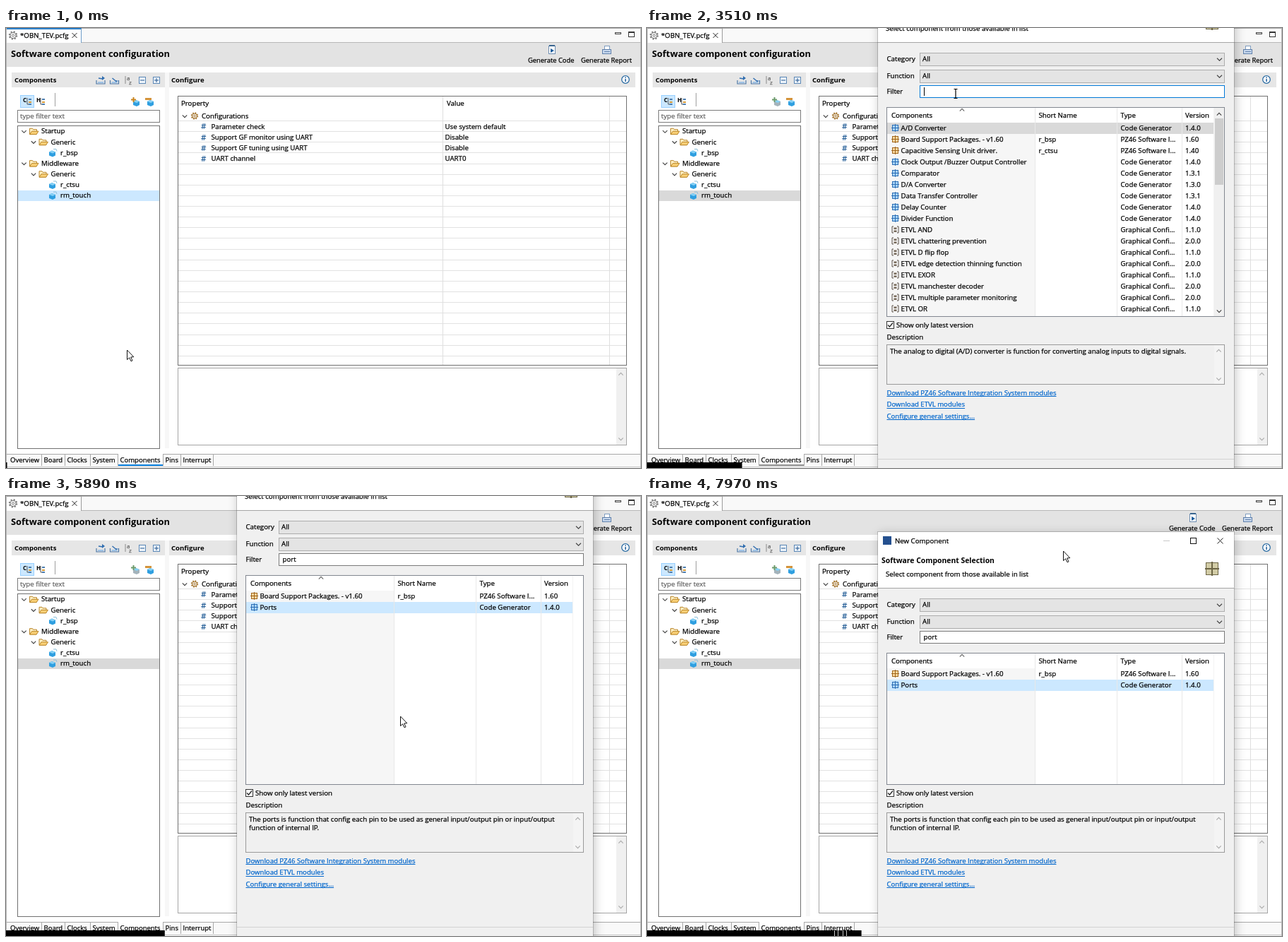
These frames come from a looping animation (899 px wide and 623 px high, 8000 ms). An HTML page with a canvas:

```html
<!DOCTYPE html>
<html lang="en">
<head>
<meta charset="utf-8">
<title>Component configuration</title>
<style>
  html, body { margin: 0; width: 100%; height: 100%; overflow: hidden; background: #fff; }
  canvas { display: block; }
</style>
</head>
<body>
<canvas id="stage" width="899" height="623"></canvas>
<script>
const ctx = document.getElementById('stage').getContext('2d');
const LOOP = 8000;
const FONT = '"Open Sans", "Noto Sans", sans-serif';
const BLUE = '#0078d7', PICK = '#cce8ff', IDLE = '#d9d9d9', FACE = '#f0f0f0';

// Moments of the interaction, in ms
const AT = { addClick: 1560, open: 1750, leaveAdd: 2120, fieldClick: 3050,
             filter: 4060, rowClick: 5100, drag: 7400 };
const KEYS = [3650, 3760, 3900, 4000];

const PATH = [
  [0, 171, 456], [120, 171, 456], [840, 206, 281], [1400, 181, 105], [2060, 181, 105],
  [2850, 437, 93], [4450, 437, 93], [4850, 432, 154], [5250, 432, 154],
  [5720, 558, 312], [5950, 558, 312], [6560, 596, 141], [7100, 595, -32],
  [7400, 595, -32], [7530, 594, 2], [7750, 591, 53], [7970, 589, 78], [8000, 589, 78]
];
const GROW = [[0, 0], [AT.drag, 0], [7530, 34], [7750, 85], [7970, 110], [8000, 110]];

const CATALOG = [
  ['A/D Converter', '', 0, '1.4.0'],
  ['Board Support Packages. - v1.60', 'r_bsp', 1, '1.60'],
  ['Capacitive Sensing Unit driver.', 'r_ctsu', 1, '1.40'],
  ['Clock Output /Buzzer Output Controller', '', 0, '1.4.0'],
  ['Comparator', '', 0, '1.3.1'],
  ['D/A Converter', '', 0, '1.3.0'],
  ['Data Transfer Controller', '', 0, '1.3.1'],
  ['Delay Counter', '', 0, '1.4.0'],
  ['Divider Function', '', 0, '1.4.0'],
  ['ETVL AND', '', 2, '1.1.0'],
  ['ETVL chattering prevention', '', 2, '2.0.0'],
  ['ETVL D flip flop', '', 2, '1.1.0'],
  ['ETVL edge detection thinning function', '', 2, '2.0.0'],
  ['ETVL EXOR', '', 2, '1.1.0'],
  ['ETVL manchester decoder', '', 2, '2.0.0'],
  ['ETVL multiple parameter monitoring', '', 2, '2.0.0'],
  ['ETVL OR', '', 2, '1.1.0']
];
const FOUND = [CATALOG[1], ['Ports', '', 0, '1.4.0']];
const TYPES = ['Code Generator', 'PZ46 Software I...', 'Graphical Confi...'];

function rect(x, y, w, h, c) { ctx.fillStyle = c; ctx.fillRect(x, y, w, h); }

function box(x, y, w, h, fill, edge) {
  if (fill) rect(x, y, w, h, fill);
  ctx.strokeStyle = edge;
  ctx.lineWidth = 1;
  ctx.strokeRect(x + 0.5, y + 0.5, w - 1, h - 1);
}

// y is the middle of the capitals; the baseline sits on a whole pixel
function text(s, x, y, color = '#000', size = 9.7, weight = 400) {
  const base = Math.round(y + size * 0.34);
  ctx.font = `${weight} ${size}px ${FONT}`;
  ctx.fillStyle = color;
  ctx.fillText(s, x, base);
  if (weight === 400) {
    // a hairline outline gives small text its dense look
    ctx.strokeStyle = color;
    ctx.lineWidth = 0.25;
    ctx.strokeText(s, x, base);
  }
  return ctx.measureText(s).width;
}

function bold(s, x, y, size) { text(s, x, y, '#000', size, 700); }

function line(points, color, width = 1) {
  ctx.beginPath();
  points.forEach(([x, y], i) => i ? ctx.lineTo(x, y) : ctx.moveTo(x, y));
  ctx.strokeStyle = color;
  ctx.lineWidth = width;
  ctx.stroke();
}

function poly(points, fill, edge, width = 1) {
  ctx.beginPath();
  points.forEach(([x, y], i) => i ? ctx.lineTo(x, y) : ctx.moveTo(x, y));
  ctx.closePath();
  ctx.fillStyle = fill;
  ctx.fill();
  if (edge) { ctx.strokeStyle = edge; ctx.lineWidth = width; ctx.stroke(); }
}

function chevron(x, y, dir, color = '#404040', r = 3.2) {
  line([[x - r, y - dir * r / 2], [x, y + dir * r / 2], [x + r, y - dir * r / 2]], color, 1.1);
}

function cross(x, y, r) {
  line([[x - r, y - r], [x + r, y + r]], '#222');
  line([[x - r, y + r], [x + r, y - r]], '#222');
}

function gear(x, y, r, color) {
  ctx.strokeStyle = color;
  for (const [rad, w, dash] of [[r, 1.8, [r * 0.4, r * 0.385]], [r * 0.75, 1.1, []], [r * 0.3, 1, []]]) {
    ctx.beginPath();
    ctx.setLineDash(dash);
    ctx.lineWidth = w;
    ctx.arc(x, y, rad, 0, 7);
    ctx.stroke();
  }
  ctx.setLineDash([]);
}

function folder(x, y) {
  poly([[x, y + 4], [x, y - 4], [x + 4, y - 4], [x + 5, y - 2.5], [x + 10, y - 2.5], [x + 10, y + 4]], '#fff0c4', '#b98528');
  poly([[x, y + 4.5], [x + 3, y], [x + 12.5, y], [x + 9.5, y + 4.5]], '#f8cf76', '#b98528');
}

function cube(x, y, color = '#2f9fe0') {
  poly([[x, y - 2], [x + 4, y - 4], [x + 9, y - 2], [x + 9, y + 3], [x + 5, y + 5], [x, y + 3]], color);
  poly([[x, y - 2], [x + 4, y - 4], [x + 9, y - 2], [x + 5, y]], '#86d0f5');
}

function driver(x, y) {
  cube(x, y + 1);
  line([[x + 6, y - 5], [x + 10, y - 5], [x + 11, y - 2]], '#8ebfd9');
}

function tiles(x, y, r, fill, edge) {
  box(x - r, y - r, r * 2, r * 2, fill, edge);
  rect(x - 0.5, y - r - 1, 1, r * 2 + 2, edge);
  rect(x - r - 1, y - 0.5, r * 2 + 2, 1, edge);
}

function rowIcon(kind, x, y) {
  if (kind === 0) return tiles(x, y, 4.5, '#a9d4f7', '#2d6fb5');
  if (kind === 1) return tiles(x, y, 4.5, '#fbd9a0', '#a0661c');
  for (const s of [-1, 1])
    line([[x + s * 2.5, y - 4.5], [x + s * 4.5, y - 4.5], [x + s * 4.5, y + 4.5], [x + s * 2.5, y + 4.5]], '#5a5148');
  rect(x - 2, y - 3, 4, 2.5, '#77695a');
  rect(x - 2, y + 1, 4, 2.5, '#77695a');
}

function lerpTrack(track, t, ease) {
  let i = 1;
  while (i < track.length - 1 && track[i][0] < t) i++;
  const a = track[i - 1], b = track[i];
  let k = Math.min(1, Math.max(0, (t - a[0]) / (b[0] - a[0])));
  if (ease) k = k * k * (3 - 2 * k);
  return a.slice(1).map((v, n) => v + (b[n + 1] - v) * k);
}

function topBar(active) {
  rect(0, 0, 899, 21, '#f9f9f9');
  rect(0, 0, 899, 1, '#a8a8a8');
  rect(0, 0, 107, 21, '#fff');
  rect(0, 0, 107, active ? 2 : 1, active ? '#2a7fc9' : '#999');
  rect(106, 1, 1, 20, active ? '#6d9cc8' : '#999');
  rect(107, 20, 792, 1, '#b8b8b8');
  gear(10, 10.5, 5.3, '#777');
  text('*OBN_TEV.pcfg', 20, 10.5);
  cross(97, 10.5, 3.5);
  box(862, 6, 9, 3, '#fff', '#444');
  box(881, 5, 9, 8, '#fff', '#333');
  rect(881, 5, 9, 2, '#333');
}

function header() {
  rect(0, 21, 899, 34, '#e3e3e3');
  bold('Software component configuration', 7, 36.5, 12.9);
  box(768, 25, 10, 12, '#fff', '#6c8cb0');
  rect(769, 24, 8, 2, '#39658f');
  poly([[771, 29], [776, 32], [771, 35]], '#1d5c9c');
  text('Generate Code', 739, 45.5, '#000', 9.4);
  box(847, 25, 8, 6, '#fff', '#7f9dc0');
  box(844, 30, 13, 7, '#c9d9ee', '#5f80ab');
  rect(847, 33, 8, 1, '#5f80ab');
  text('Generate Report', 814, 45.5, '#000', 9.3);
}

function sectionTools() {
  for (const [x, s] of [[134, 1], [153.5, -1]]) {
    line([[x - 6, 74], [x - 6, 79], [x + 6, 79], [x + 6, 74]], '#4e79a8', 1.2);
    rect(x - 4, 76, 8, 2, '#9fc3e6');
    line([[x - 3, 71], [x + 3, 74 - s * 2]], '#2f6db0', 1.4);
    poly([[x + 6, 73 - s * 2], [x + 2, 71 - s * 3], [x + 2, 75 - s]], '#2f6db0');
  }
  line([[169, 68], [169, 79]], '#8a8a8a');
  text('a', 171, 71, '#666', 8);
  text('z', 174, 77, '#666', 8);
  for (const x of [188, 208]) {
    box(x, 69, 10, 10, '#eef5fc', '#5b87b5');
    rect(x + 2, 73.5, 6, 1, '#24568f');
  }
  rect(212.5, 71, 1, 6, '#24568f');
}

function treePanel(t, hoverAdd) {
  rect(8, 63, 217, 21, '#e6e6e6');
  bold('Components', 12, 73.5, 9.4);
  sectionTools();

  box(20, 95, 20, 18, PICK, '#99d1ff');
  bold('C', 24, 102, 8);
  bold('H', 43, 102, 8);
  for (const x of [32, 51]) {
    line([[x - 2, 99], [x - 2, 108], [x + 2, 108]], '#555');
    for (const y of [100, 104, 107]) rect(x, y, 4, 2, y === 104 ? '#d79a35' : '#4d7fb3');
  }
  rect(69, 92, 1, 19, '#a0a0a0');

  const grey = t >= AT.leaveAdd;
  if (hoverAdd) box(174, 95, 20, 18, PICK, '#99d1ff');
  cube(180, 106, grey ? '#a4b3bb' : '#2f9fe0');
  const plus = grey ? '#6c9b6c' : '#c9851f';
  rect(177, 100.5, 7, 2, plus);
  rect(179.5, 98, 2, 7, plus);
  cube(200, 106);
  rect(197, 99, 9, 3, '#d4933a');

  box(16, 116, 202, 18, '#fff', '#7a7a7a');
  text('type filter text', 20, 125, '#666');
  box(16, 138, 202, 458, '#fff', '#707070');
  const rows = [['Startup', 0], ['Generic', 1], ['r_bsp', 2], ['Middleware', 0],
                ['Generic', 1], ['r_ctsu', 2], ['rm_touch', 2]];
  rect(17, 230, 200, 15, t < AT.addClick ? PICK : IDLE);
  rows.forEach(([name, depth], i) => {
    const y = 146.2 + i * 15.15, x = 33.5 + depth * 13.5;
    if (depth < 2) { chevron(x - 8, y + 0.5, 1); folder(x, y); }
    else driver(61, y);
    text(name, x + 16.5, y);
  });
}

function propertyPanel() {
  rect(225, 63, 6, 532, '#f7f7f7');
  rect(231, 63, 660, 21, '#e6e6e6');
  bold('Configure', 234, 73.5, 9.6);
  ctx.beginPath();
  ctx.arc(877, 73, 5.3, 0, 7);
  ctx.fillStyle = '#fff';
  ctx.fill();
  ctx.strokeStyle = '#2b6ca3';
  ctx.lineWidth = 1.3;
  ctx.stroke();
  rect(876.3, 72, 1.5, 4, '#1d5c9c');
  rect(876.3, 69.5, 1.5, 1.5, '#1d5c9c');

  box(243, 96, 636, 382, '#fff', '#707070');
  for (let i = 0; i < 23; i++) rect(244, Math.round(131 + i * 15.13), 634, 1, '#e2e2e2');
  for (const x of [618, 854]) rect(x, 97, 1, 380, '#dedede');
  text('Property', 248, 107);
  text('Value', 624, 107);
  chevron(253, 125, 1);
  gear(267, 124.5, 4.3, '#a4752f');
  text('Configurations', 277, 124.5);
  [['Parameter check', 'Use system default'], ['Support GF monitor using UART', 'Disable'],
   ['Support GF tuning using UART', 'Disable'], ['UART channel', 'UART0']].forEach(([name, value], i) => {
    const y = 139.5 + i * 15.15;
    text('#', 276, y, '#1f5a94', 11.5, 600);
    text(name, 290.5, y);
    text(value, 621.5, y);
  });

  box(243, 481, 636, 110, '#fff', '#a5a5a5');
  rect(864, 482, 14, 108, FACE);
  chevron(870.5, 490, -1, '#aaa');
  chevron(870.5, 582, 1, '#aaa');
}

function bottomTabs(active) {
  rect(0, 603, 899, 20, '#f9f9f9');
  rect(0, 603, 899, 1, '#a8a8a8');
  rect(159, 603, 63, 17, '#fff');
  const tabs = ['Overview', 'Board', 'Clocks', 'System', 'Components', 'Pins', 'Interrupt'];
  const edges = [3, 51, 84, 120, 159, 223, 248, 294];
  tabs.forEach((name, i) => {
    text(name, edges[i] + (i ? 2.5 : 3), 612, '#000', 9.5);
    rect(edges[i + 1] - 1, 604, 1, 16, '#a8a8a8');
  });
  rect(159, 618, 63, 2, active ? BLUE : '#8a8a8a');
  rect(0, 621, 899, 1, '#c4c4c4');
  rect(0, 0, 1, 623, '#b5b5b5');
  rect(898, 0, 1, 623, '#b5b5b5');
}

function combo(label, y, hover) {
  text(label, 339.5, y);
  box(386, y - 9, 432, 19, hover ? '#e5f1fb' : '#e4e4e4', hover ? BLUE : '#adadad');
  text('All', 390, y);
  chevron(810.5, y + 0.5, 1, '#444', 3.5);
}

function filterField(t, y) {
  const focused = t >= AT.fieldClick && t < AT.rowClick;
  text('Filter', 339.5, y);
  box(386, y - 9, 432, 18, '#fff', focused ? BLUE : '#7a7a7a');
  const typed = 'port'.slice(0, KEYS.filter(k => t >= k).length);
  const w = text(typed, 391.5, y);
  const last = [AT.fieldClick, ...KEYS].filter(k => t >= k).pop();
  if (focused && (t - last) % 1060 < 530) rect(Math.round(391.5 + w), y - 6, 1, 12, '#000');
}

function componentTable(t, top, cur) {
  const filtered = t >= AT.filter;
  const rows = filtered ? FOUND : CATALOG;
  const first = top + 22, h = 409 - top;
  let picked = filtered ? -1 : 0;
  if (t >= AT.rowClick) picked = 1;
  const idle = t >= AT.fieldClick && t < AT.rowClick;

  ctx.save();
  ctx.beginPath();
  ctx.rect(339, top, 479, h);
  ctx.clip();
  rect(339, top, 479, h, '#fff');
  rect(340, first, 209, h, '#f6f6f6');
  rows.forEach(([name, short, kind, version], i) => {
    const y0 = first + i * 16, y = y0 + 8;
    const hover = cur.visible && cur.x > 340 && cur.x < 802 && cur.y >= y0 && cur.y < y0 + 16;
    if (i === picked) rect(340, y0, 462, 16, idle ? IDLE : PICK);
    else if (hover) rect(340, y0, 462, 16, '#e5f3ff');
    rowIcon(kind, 351.5, y - 0.5);
    text(name, 359.5, y);
    text(short, 554.5, y);
    text(TYPES[kind], 670.5, y);
    text(version, 762, y);
  });
  for (const x of [549, 665, 757, 802]) rect(x, top, 1, h, x === 802 ? '#f3f3f3' : '#e8e8e8');
  if (!filtered) {
    rect(803, top + 1, 14, h - 2, FACE);
    rect(804, top + 16, 12, 94, '#cdcdcd');
    chevron(810, top + 10, -1);
    chevron(810, 401, 1);
  }
  ctx.restore();

  [['Components', 346], ['Short Name', 554.5], ['Type', 670.5], ['Version', 762]]
    .forEach(([s, x]) => text(s, x, top + 11.5));
  chevron(446, top + 4, -1, '#666');
  box(339, top, 479, h, null, '#828790');
}

function dialog(t, cur) {
  const dy = Math.round(lerpTrack(GROW, t)[0]) - 110;
  const top = 51 + dy, tall = 660 - top;
  ctx.save();
  ctx.shadowColor = 'rgba(0,0,0,.24)';
  ctx.shadowBlur = 14;
  ctx.shadowOffsetX = 2;
  ctx.shadowOffsetY = 3;
  rect(327, top, 504, tall, FACE);
  ctx.restore();
  box(326, top - 1, 506, tall + 2, null, 'rgba(0,0,0,.18)');

  rect(327, top, 504, 79, '#fff');
  rect(334, 57 + dy, 12, 12, '#24508f');
  text('New Component', 351, 63.5 + dy);
  rect(731, 63 + dy, 9, 1, '#c8c8c8');
  box(769, 59 + dy, 9, 9, null, '#111');
  cross(811.5, 63.5 + dy, 4);
  bold('Software Component Selection', 332, 91 + dy, 10.4);
  text('Select component from those available in list', 338, 111 + dy);
  tiles(800, 103 + dy, 9, '#d2cca6', '#6c6545');
  rect(799, 93 + dy, 2, 20, '#6c6545');
  rect(790, 102 + dy, 20, 2, '#6c6545');
  rect(327, 130 + dy, 504, 1, '#a5a5a5');

  const over = y => cur.visible && cur.x > 386 && cur.x < 818 && Math.abs(cur.y - y) < 9.5;
  const [category, func, filter] = [154 + dy, 178 + dy, 200 + dy];
  combo('Category', category, over(category));
  combo('Function', func, over(func));
  filterField(t, filter);
  componentTable(t, 222 + dy, cur);

  box(339, 415, 11, 11, '#fff', '#333');
  line([[341, 420.5], [343.5, 423], [348, 417.5]], '#222', 1.3);
  text('Show only latest version', 353, 420.5);
  text('Description', 339.5, 438);
  box(339, 448, 479, 57, FACE, '#9a9a9a');
  rect(803, 449, 14, 55, '#f4f4f4');
  chevron(809.5, 457, -1, '#aaa');
  chevron(809.5, 497, 1, '#aaa');
  if (t < AT.filter) {
    text('The analog to digital (A/D) converter is function for converting analog inputs to digital signals.', 344, 457.5);
  } else if (t >= AT.rowClick) {
    text('The ports is function that config each pin to be used as general input/output pin or input/output', 344, 457.5);
    text('function of internal IP.', 344, 470);
  }
  ['Download PZ46 Software Integration System modules', 'Download ETVL modules', 'Configure general settings...']
    .forEach((s, i) => {
      const y = 516.5 + i * 16.7;
      const w = text(s, 339.5, y, '#0066cc', 9.6);
      rect(339.5, Math.round(y + 4.5), w, 1, '#0066cc');
    });
  rect(327, 610, 504, 1, '#d2d2d2');
  return over(filter);
}

function pointer({ x, y }, beam) {
  if (beam) {
    line([[x - 2.5, y - 6.5], [x + 2.5, y - 6.5]], '#000');
    line([[x, y - 6.5], [x, y + 6.5]], '#000', 1.2);
    line([[x - 2.5, y + 6.5], [x + 2.5, y + 6.5]], '#000');
    return;
  }
  const shape = [[0.5, 0], [0.5, 13.6], [3.6, 10.8], [6, 15.8], [8, 14.9], [5.7, 10], [9.8, 9.7]];
  poly(shape.map(([a, b]) => [x + a, y + b]), '#fff', '#111');
}

function progress(t) {
  const w = 1.5 + t * 0.0379;
  rect(0, 615, w, 8, '#000');
  for (const x of [265, 270, 277, 282]) if (x < w - 1) rect(x, 615, 1, 8, '#c8c8c8');
}

function draw(t) {
  const [x, y] = lerpTrack(PATH, t, t < AT.drag);
  const hidden = (t >= KEYS[0] && t < 4460) || (t >= 7100 && t < 7560);
  const cur = { x, y, visible: !hidden };
  const open = t >= AT.open;
  const hoverAdd = t < AT.leaveAdd && x >= 174 && x < 194 && y >= 95 && y < 113;

  rect(0, 0, 899, 623, '#fff');
  topBar(!open);
  header();
  treePanel(t, hoverAdd);
  propertyPanel();
  bottomTabs(!open);
  const beam = open && dialog(t, cur);
  progress(t);
  if (cur.visible) pointer(cur, beam);
}

function tick() {
  draw(performance.now() % LOOP);
  requestAnimationFrame(tick);
}
tick();
</script>
</body>
</html>
```
